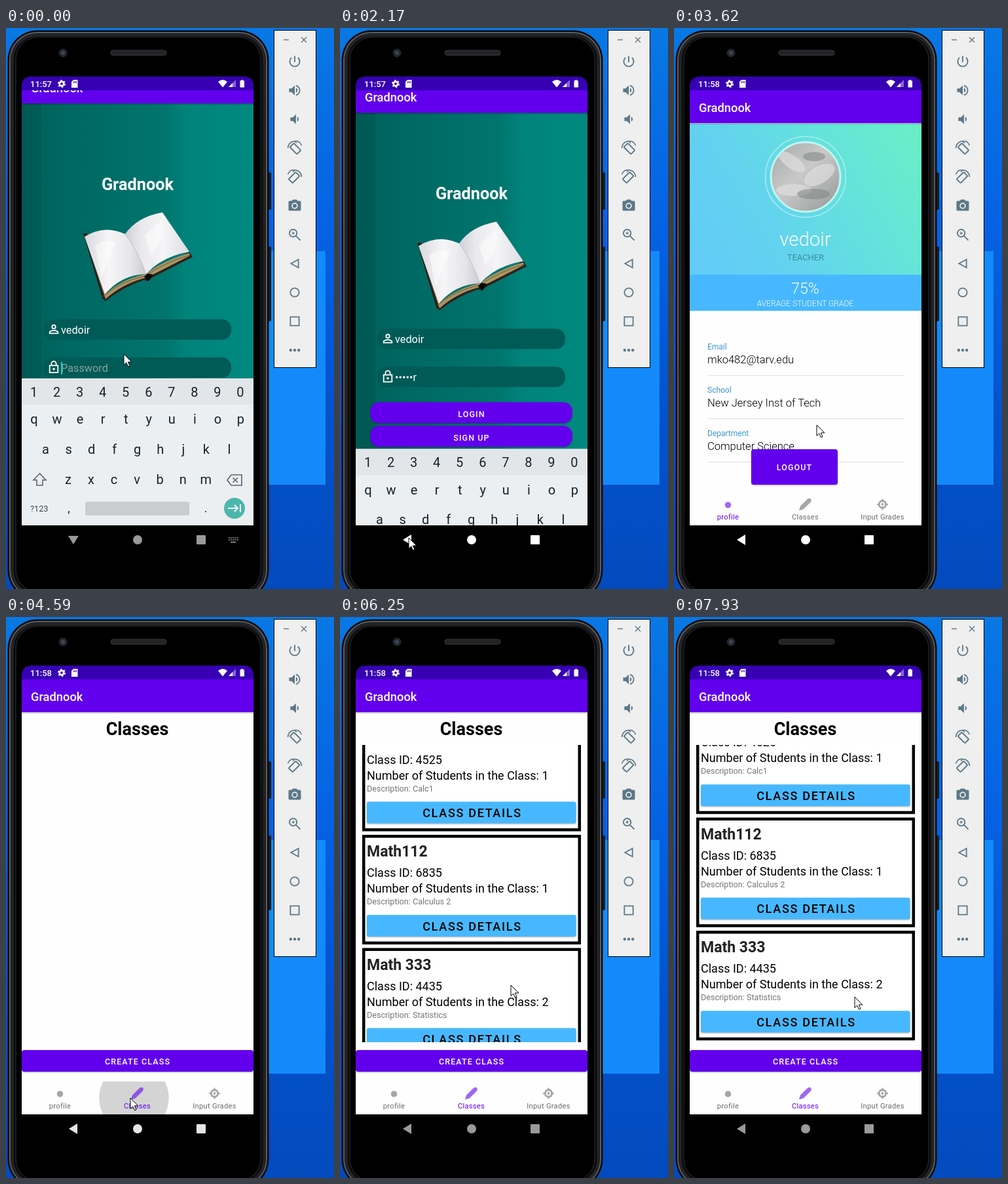
An HTML page that plays this animation: 501x855 px, repeating every 8 s.

```html
<!DOCTYPE html>
<html lang="en">
<head>
<meta charset="utf-8">
<title>Class app demo</title>
<style>
html, body { margin: 0; height: 100%; overflow: hidden; background: #0560e0; }
svg { display: block; width: 501px; height: 855px; font-family: Roboto, Arial, sans-serif; }
text { white-space: pre; }
.mid { text-anchor: middle; }
.med { font-weight: 500; }
.bold { font-weight: 700; }
.light { font-weight: 300; }
.line { fill: none; stroke: currentColor; stroke-width: 2; }
.btn { fill: #6200ee; filter: drop-shadow(0 1.5px 1px #0005); }
.cap { fill: #fff; font: 500 12.5px Roboto, Arial, sans-serif; letter-spacing: 1.1px; text-anchor: middle; }
</style>
</head>
<body>
<svg id="stage" viewBox="0 0 501 855"></svg>
<script>
const USER = 'vedoir', APP = 'Gradnook', LOOP = 8000;
const stage = document.getElementById('stage');

const txt = (x, y, size, s, cls = '', fill = '#000', more = '') =>
  `<text x="${x}" y="${y}" font-size="${size}" class="${cls}" fill="${fill}" ${more}>${s}</text>`;
const rect = (x, y, w, h, fill, r = 0, more = '') =>
  `<rect x="${x}" y="${y}" width="${w}" height="${h}" fill="${fill}" rx="${r}" ${more}/>`;
const circle = (x, y, r, fill, more = '') => `<circle cx="${x}" cy="${y}" r="${r}" fill="${fill}" ${more}/>`;
const path = (d, fill = 'currentColor', more = '') => `<path d="${d}" fill="${fill}" ${more}/>`;
const stroke = (d, w = 2) => `<path class="line" d="${d}" style="stroke-width:${w}"/>`;
// a 24-unit icon centred on x, y
const icon = (x, y, k, body, color) =>
  `<g color="${color}" transform="translate(${x} ${y}) scale(${k}) translate(-12 -12)">${body}</g>`;
const gradient = (id, line, stops) => `<linearGradient id="${id}" ${line}>` +
  stops.map(([o, c]) => `<stop offset="${o}" stop-color="${c}"/>`).join('') + '</linearGradient>';

const defs = `<defs>
${gradient('sky', 'x2="0" y2="1"', [[0, '#0878e4'], [.35, '#0562e4'], [.7, '#0352cc'], [1, '#034bbd']])}
${gradient('teal', '', [[0, '#00605a'], [.35, '#006c66'], [.62, '#00756e'], [.71, '#00837a'], [1, '#00897f']])}
${gradient('mint', 'gradientUnits="userSpaceOnUse" x1="24" y1="376" x2="388" y2="162"',
  [[0, '#62caf8'], [.35, '#62d3ee'], [.65, '#64e2dc'], [1, '#69f0c4']])}
${gradient('pageL', '', [[0, '#d9d9de'], [.4, '#f6f6f8'], [.75, '#e6e6ea'], [1, '#c9c9d0']])}
${gradient('pageR', '', [[0, '#cfcfd6'], [.25, '#e9e9ed'], [.6, '#f5f5f7'], [1, '#dcdce2']])}
${gradient('cloud', 'x2="1" y2="1"', [[0, '#a5a7a8'], [.45, '#c9c9c9'], [1, '#949697']])}
<clipPath id="screen"><path d="M24 758V90Q24 74 40 74H362Q378 74 378 90V758Z"/></clipPath>
<clipPath id="list"><rect x="24" y="195" width="354" height="453"/></clipPath>
<clipPath id="tabbar"><rect x="24" y="708" width="354" height="50"/></clipPath>
<clipPath id="photo"><circle cx="201" cy="227" r="52"/></clipPath>
</defs>`;

const phone = rect(0, 0, 501, 855, 'url(#sky)') +
  rect(132, 340, 356, 356, '#148afa') +
  rect(399, 220, 6, 57, '#1c1d20', 2) + rect(399, 333, 6, 114, '#1c1d20', 2) +
  rect(2.5, 3.5, 399, 868, '#0c0c0d', 45) +
  rect(6, 7, 392, 861, 'none', 42, 'stroke="#5c5e62" stroke-width="2"') +
  rect(9.5, 10.5, 385, 854, 'none', 38, 'stroke="#232427" stroke-width="4"') +
  rect(15, 14, 374, 846, '#000', 34, 'stroke="#2c2d30"') +
  circle(87, 38, 6.5, '#23262e') + circle(87, 38, 3, '#3c4654') +
  rect(160, 34, 85, 7.5, '#222325', 3.5, 'stroke="#38393c"');

const turn = dir => `<g transform="translate(12 12) scale(${dir} 1)">
  <rect class="line" x="-4.5" y="-8" width="9" height="16" rx="1" transform="translate(1 1) rotate(-45)"/>
  ${stroke('M-11 0A11 11 0 0 1 0 -11L3 -8M0 -11H4A11 11 0 0 1 11 -4', 1.6)}</g>`;
const tools = [
  path('M13 3h-2v10h2V3zm4.83 2.17l-1.42 1.42A6.92 6.92 0 0 1 19 12a7 7 0 0 1-14 0c0-2.23 1.05-4.22 2.58-5.42L6.17 5.17A8.93 8.93 0 0 0 3 12a9 9 0 0 0 18 0c0-2.74-1.23-5.18-3.17-6.83z'),
  path('M3 9v6h4l5 5V4L7 9H3zm13.5 3A4.5 4.5 0 0 0 14 7.97v8.05A4.5 4.5 0 0 0 16.5 12zM14 3.23v2.06a7 7 0 0 1 0 13.42v2.06a9 9 0 0 0 0-17.54z'),
  path('M5 9v6h4l5 5V4L9 9H5zm13.5 3A4.5 4.5 0 0 0 16 7.97v8.05A4.5 4.5 0 0 0 18.5 12z'),
  turn(1), turn(-1),
  path('M9 2L7.17 4H4a2 2 0 0 0-2 2v12a2 2 0 0 0 2 2h16a2 2 0 0 0 2-2V6a2 2 0 0 0-2-2h-3.17L15 2H9zm3 15a5 5 0 1 1 0-10 5 5 0 0 1 0 10z') + circle(12, 12, 3.2, 'currentColor'),
  stroke('M15.5 9.5A6 6 0 1 1 3.5 9.5A6 6 0 1 1 15.5 9.5M14 14L21 21') + stroke('M9.5 7V12M7 9.5H12', 1.3),
  stroke('M18 5.5V18.5L6 12Z', 1.9),
  stroke('M19 12A7 7 0 1 1 5 12A7 7 0 1 1 19 12', 1.9),
  stroke('M5 5H19V19H5Z', 1.9),
  [5.5, 12, 18.5].map(x => circle(x, 12, 2.3, 'currentColor')).join('')
];
const toolbar = rect(409.5, 3.5, 64, 514, '#efefef', 0, 'stroke="#000"') +
  `<g color="#5b7886">${stroke('M424 18H432', 1.4)}${stroke('M451 14L459 22M459 14L451 22', 1.4)}</g>` +
  tools.map((t, i) => icon(441, 51 + 44 * i, .95, t, '#5b7886')).join('');

const status = rect(24, 74, 354, 21, '#3700b3') +
  txt(37, 90, 13, '11:57', 'med', '#fff', 'id="clock"') +
  circle(85, 85, 3.2, 'none', 'stroke="#fff" stroke-width="2.6"') +
  circle(85, 85, 5, 'none', 'stroke="#fff" stroke-width="2" stroke-dasharray="2.6 2.64"') +
  path('M103 79H109.5V91H100V82Z', '#fff') + path('M103.5 81V84M105.5 81V84M107.5 81V84', 'none', 'stroke="#3700b3"') +
  path('M324 82Q331 76 338 82L331 90.5Z', '#fff') +
  path('M351 79V90H340Z', '#fff', 'opacity=".4"') + path('M346 84V90H340Z', '#fff') +
  path('M359.3 79H362V80.3H364V90.5H357.5V80.3H359.3Z', '#fff');
const appBar = rect(24, 144, 354, 3, '#0003') + rect(24, 95, 354, 50, '#6200ee') + txt(38, 128, 18.3, APP, 'med', '#fff');

const book =
  path('M118 343L124 343L156 434Q190 412 214 405L280 371L285 379L222 411Q218 418 211 414Q180 424 152 446L147 442Z', '#2b211c') +
  path('M121 349L151 436Q178 412 214 405Q236 386 280 373L281 377L220 408L212 411Q178 420 152 443Z', '#a99463') +
  path('M148 439Q178 414 213 408Q240 388 281 376', 'none', 'stroke="#6d5c38" stroke-width="1"') +
  path('M120 348Q150 329 182 344Q204 374 214 405Q176 406 151 436Z', 'url(#pageL)') +
  path('M182 344Q200 318 239 311L280 371Q238 378 214 405Q204 374 182 344Z', 'url(#pageR)') +
  path('M136 362Q152 350 168 358Q158 380 146 410Z', '#fff', 'opacity=".5"') +
  path('M212 347Q226 334 238 322Q244 350 222 376Z', '#fff', 'opacity=".5"') +
  path('M211 409L216 404L225 406L217 416Z', '#0b0908');
const person = path('M12 6a2 2 0 1 1 0 4 2 2 0 0 1 0-4m0 9c2.7 0 5.8 1.29 6 2v1H6v-1c.2-.71 3.3-2 6-2m0-11a4 4 0 1 0 0 8 4 4 0 0 0 0-8zm0 9c-2.67 0-8 1.34-8 4v3h16v-3c0-2.66-5.33-4-8-4z');
const lock = stroke('M5 9H19V21H5ZM8 9V6A4 4 0 0 1 16 6V9', 2) + circle(12, 15, 2, 'currentColor');
const field = (y, glyph, id) => rect(57, y, 287, 31, '#005a56', 14) + icon(73, y + 15, .9, glyph, '#fff') +
  txt(84, y + 22, 16.3, '', '', '#fff', `id="${id}"`);
const login = rect(24, 95, 354, 663, 'url(#teal)') +
  `<g id="pan">${rect(24, 95, 30, 700, '#003c38', 0, 'opacity=".2"')}${appBar}
  ${txt(201, 277, 25.3, APP, 'mid bold', '#fff')}${book}
  ${field(474, person, 'user')}${field(532, lock, 'pass')}
  ${rect(0, 539, 2, 19, '#1fd0b8', 0, 'id="caret"')}
  ${rect(46, 586, 309, 32, '', 14, 'class="btn"')}<text class="cap" x="201" y="609">LOGIN</text>
  ${rect(46, 622, 309, 32, '', 14, 'class="btn"')}<text class="cap" x="201" y="645">SIGN UP</text></g>`;

const keyRow = (s, x, y) => [...s].map((c, i) => txt(x + 35.05 * i, y, 20, c, 'mid', '#15232b')).join('');
const keyboard = `<g id="keyboard" color="#5c666c">` + rect(24, 534, 354, 224, '#eceff1') + rect(24, 534, 354, 40, '#e3e6e9') +
  keyRow('1234567890', 42.5, 561.5) + keyRow('qwertyuiop', 43, 603) + keyRow('asdfghjkl', 60.5, 648.5) + keyRow('zxcvbnm', 95, 694.5) +
  stroke('M51.5 679L42 689H47V697H56V689H61Z', 1.6) +
  stroke('M344 681H360V697H344L338 689ZM346.5 685.5L354 692.5M354 685.5L346.5 692.5', 1.7) +
  txt(37, 737, 12.7, '?123', '', '#37474f') + txt(96, 738, 18, ',', 'mid', '#15232b') + txt(305, 738, 18, '.', 'mid', '#15232b') +
  rect(121, 722, 159, 21, '#c9cdd0', 3) + circle(349, 732, 16, '#4db6ac') +
  `<g color="#fff">${stroke('M339 732H354M349 727L354 732L349 737M358 726V738', 1.9)}</g></g>`;

const info = (y, label, value) => txt(51, y, 12, label, '', '#3d96d2') +
  txt(51, y + 21, 16.5, value, 'light') + rect(51, y + 39, 300, 1, '#e0e0e0');
const profile = `<g id="profile">` + rect(24, 146, 354, 230, 'url(#mint)') +
  circle(201, 227, 61.5, 'none', 'stroke="#fff" stroke-opacity=".45" stroke-width="1.6"') +
  `<g clip-path="url(#photo)">${circle(201, 227, 52, 'url(#cloud)')}
    <g fill="#dedede" opacity=".7"><ellipse cx="180" cy="204" rx="24" ry="10" transform="rotate(35 180 204)"/>
    <ellipse cx="222" cy="224" rx="26" ry="13" transform="rotate(-30 222 224)"/><ellipse cx="183" cy="247" rx="27" ry="9"/></g>
    <g fill="#858788" opacity=".6"><ellipse cx="213" cy="253" rx="25" ry="8"/><ellipse cx="214" cy="196" rx="17" ry="7"/></g></g>` +
  circle(201, 227, 53, 'none', 'stroke="#c3f4ee" stroke-width="3"') +
  txt(200.5, 332, 29.5, USER, 'mid light', '#fff') + txt(201, 354, 12.8, 'TEACHER', 'mid', '#3b8c98') +
  rect(24, 376, 354, 55, '#47b8ff') + txt(200.5, 405, 23, '75%', 'mid light', '#fff') +
  txt(200.5, 423.5, 12, 'AVERAGE STUDENT GRADE', 'mid light', '#fff') +
  info(490, 'Email', 'mko482@tarv.edu') + info(556, 'School', 'New Jersey Inst of Tech') + info(622, 'Department', 'Computer Science') +
  rect(118, 642, 132, 54, '', 4, 'class="btn"') + '<text class="cap" x="184" y="674">LOGOUT</text></g>';

const CARD = 172.5;
const card = ([name, id, count, about], i) => `<g transform="translate(0 ${198 + CARD * i})">` +
  rect(36.2, 2.2, 329.6, 162.6, '#fff', 0, 'stroke="#000" stroke-width="4.5"') +
  txt(41, 33, 23, name, 'bold', '#222') + txt(41, 64, 18, 'Class ID: ' + id) +
  txt(41, 88, 18, 'Number of Students in the Class: ' + count) +
  txt(41, 106, 12.6, 'Description: ' + about, '', '#757575') +
  rect(41, 122, 319.5, 33, '#47b8ff', 3, 'style="filter:drop-shadow(0 1.5px 1px #0005)"') +
  txt(202, 145.5, 18, 'CLASS DETAILS', 'mid med', '#000', 'letter-spacing="1.7"') + '</g>';
const classes = `<g id="classes">` + txt(200.5, 180, 27, 'Classes', 'mid bold') +
  `<g clip-path="url(#list)"><g id="cards">${[
    ['Math111', 4525, 1, 'Calc1'], ['Math112', 6835, 1, 'Calculus 2'], ['Math 333', 4435, 2, 'Statistics']
  ].map(card).join('')}</g></g>` +
  rect(24, 660, 354, 33, '', 4, 'class="btn"') + '<text class="cap" x="201" y="682">CREATE CLASS</text></g>';

const tab = (x, label, glyph) => `<g class="tab">${icon(x, 726, .95, `<g opacity=".6">${glyph}</g>`, 'currentColor')}
  ${txt(x, 749, 11.2, label, 'mid', 'currentColor', 'letter-spacing=".25"')}</g>`;
const tabs = `<g clip-path="url(#tabbar)">` + circle(195.5, 733, 0, '#000', 'id="ripple"') +
  tab(82.5, 'profile', circle(12, 13, 5, 'currentColor')) +
  tab(200.5, 'Classes', path('M2 22L4 15L15 4Q18 1 21 3Q23 6 20 9L9 20Z')) +
  tab(318.5, 'Input Grades', circle(12, 12, 5.5, 'none', 'stroke="currentColor" stroke-width="3"') +
    circle(12, 12, 2, 'currentColor') + stroke('M12 3V8M12 16V21M3 12H8M16 12H21', 2)) + '</g>';
const home = `<g id="home">${rect(24, 95, 354, 663, '#fefefe')}${profile}${classes}${appBar}${tabs}</g>`;

const nav = `<g id="nav" color="#999">` + path('M96 780L109 772V788Z', 'currentColor', 'id="back"') +
  circle(201, 780, 7, 'currentColor') + rect(291, 773, 14, 14, 'currentColor', 1) +
  `<g id="keys">${path('M95 774H111L103 787Z')}
  ${stroke('M340 777H355M340 780H355', 1.6).replaceAll('/>', ' stroke-dasharray="2 1.2"/>')}${stroke('M343 783.5H351', 1.6)}</g></g>`;
const mouse = `<path id="mouse" d="M0 0V16.5L3.8 13L6.5 19L9 18L6.4 12H11.8Z" fill="#fff" stroke="#000" stroke-width="1"/>`;

stage.innerHTML = defs + phone + toolbar + `<g clip-path="url(#screen)">${login}${keyboard}${home}${status}</g>` + nav + mouse;

const el = id => document.getElementById(id);
const show = (id, on) => el(id).style.display = on ? '' : 'none';
const move = (id, x, y) => el(id).setAttribute('transform', `translate(${x} ${y})`);
const ramp = (t, a, b) => Math.min(1, Math.max(0, (t - a) / (b - a)));
const ease = k => k * k * (3 - 2 * k);
const mix = (a, b, k) => a + (b - a) * k;

// keys: [time, ...values]
function follow(t, keys) {
  let i = 0;
  while (i < keys.length - 2 && t >= keys[i + 1][0]) i++;
  const [a, ...from] = keys[i], [b, ...to] = keys[i + 1], k = ease(ramp(t, a, b));
  return from.map((v, n) => mix(v, to[n], k));
}
const mousePath = [
  [0, 180, 497], [120, 180, 497], [600, 233, 459], [1060, 233, 459], [1180, 230, 480], [1680, 100, 794], [1930, 105, 777],
  [2170, 105, 777], [2900, 218, 605], [3900, 218, 605], [4430, 190, 733], [4740, 190, 733], [5050, 97, 766],
  [5430, 266, 458], [5670, 262, 606], [5950, 262, 606], [6240, 261, 561], [6370, 261, 561], [6800, 262, 528],
  [7030, 262, 528], [7300, 187, 600], [7620, 300, 530], [7920, 276, 579], [LOOP, 276, 579]
];
const scrollPath = [[0, 0], [5950, 0], [6240, 38.5], [6370, 38.5], [6800, 64.8], [LOOP, 64.8]];

function draw(t) {
  const typed = t < 120 ? 0 : Math.min(6, 1 + Math.floor((t - 120) / 157));
  const cleared = t >= 2850, inClasses = t >= 4470;
  const hide = ease(ramp(t, 2050, 2300));

  const setField = (id, value, hint) => {
    el(id).textContent = value || hint;
    el(id).setAttribute('fill', value ? '#fff' : '#88a19f');
  };
  setField('user', cleared ? '' : USER, 'Username');
  setField('pass', cleared || !typed ? '' : '•'.repeat(typed - 1) + USER[typed - 1], 'Password');
  el('caret').setAttribute('x', typed ? 84 + el('pass').getComputedTextLength() : 84);
  show('caret', t < 2170);
  move('pan', 0, -30 * (1 - hide));
  move('keyboard', 0, 226 * hide);

  show('keys', t < 2170);
  show('back', t >= 2170);
  const level = t < 2170 ? 153 : Math.round(mix(255, 154, ramp(t, 4490, 4890)));
  el('nav').setAttribute('color', `rgb(${level},${level},${level})`);

  show('home', t >= 3350);
  el('home').style.opacity = ramp(t, 3300, 3600);
  el('clock').textContent = t < 3350 ? '11:57' : '11:58';
  show('profile', !inClasses);
  show('classes', inClasses);
  show('cards', t >= 4740);
  move('cards', 0, -follow(t, scrollPath)[0]);
  document.querySelectorAll('.tab').forEach((g, i) =>
    g.setAttribute('color', i === +inClasses ? '#6200ee' : '#6b6b6b'));
  el('ripple').setAttribute('r', 64 * Math.sqrt(ramp(t, 4470, 4645)));
  el('ripple').setAttribute('opacity', .165 * (1 - ramp(t, 4740, 4890)));

  move('mouse', ...follow(t, mousePath));
}

function frame() {
  draw(performance.now() % LOOP);
  requestAnimationFrame(frame);
}
frame();
</script>
</body>
</html>
```
